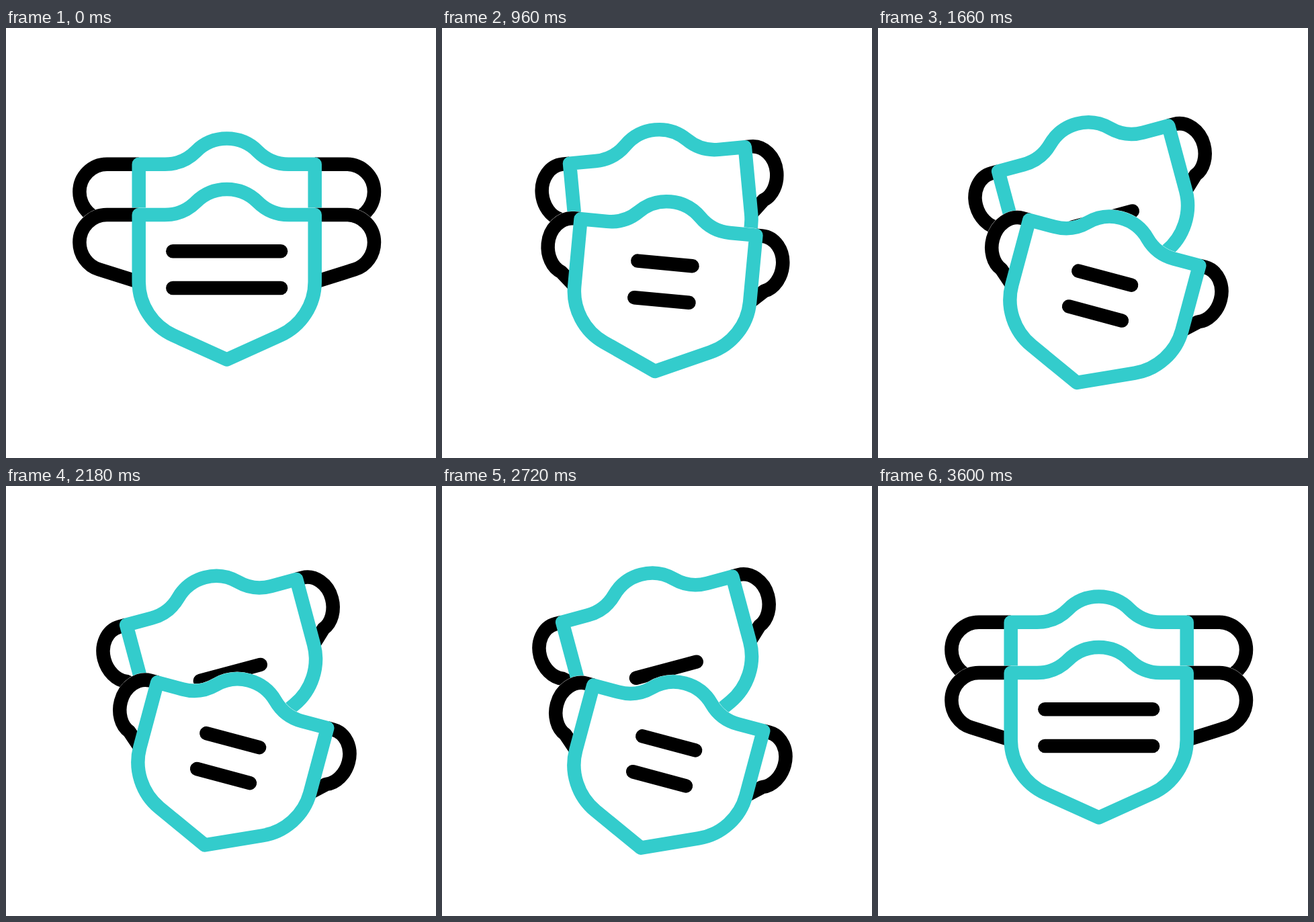
Recreate the animation shown at these times as an HTML page. Size 640 by 640 pixels, loop 3.62 s.

```html
<!DOCTYPE html>
<html lang="en">
<head>
<meta charset="utf-8">
<title>Two face masks</title>
<style>
  html, body { margin: 0; width: 100%; height: 100%; overflow: hidden; background: #fff; }
  svg { display: block; width: 100vw; height: 100vh; }
  .ink { fill: none; stroke: #000; stroke-width: 20.5; stroke-linejoin: round; }
  .loop { fill: #fff; }
  .bar { stroke-linecap: round; }
  .body { fill: #fff; stroke: #33cccc; stroke-width: 20.5; stroke-linejoin: round; }
  .halo { fill: #fff; stroke: #fff; stroke-width: 21; stroke-linejoin: round; }
</style>
</head>
<body>
<svg id="stage" viewBox="0 0 640 640"></svg>
<script>
const LOOP_MS = 3620, CENTER_X = 328.7, PIVOT_Y = 89;

// Keyframes as [ms, value], eased between neighbours
const SHRINK = [[200, 0], [800, 1], [3200, 1], [3600, 0]];
const TURN = [[800, 0], [1200, 1], [2800, 1], [3200, 0]];
const BOB = [[1200, 0], [1600, 1], [2000, 0], [2400, 1], [2800, 0]];
const BOB_SIZE = 12.9;

// Outline relative to the middle of the mask's top corners
const BODY = 'M-131 0H-92A65 65 0 0 0-46-19A65 65 0 0 1 46-19A65 65 0 0 0 92 0H131V100' +
  'C131 134 110.5 165.5 79.5 179.5L0 215.5L-79.5 179.5' +
  'C-110.5 165.5-131 134-131 100Z';

// Ear loops: mirror direction and how far each draws in
const SIDES = [{ dir: 1, pull: 38.5 }, { dir: -1, pull: 37 }];

const mix = (a, b, k) => a + (b - a) * k;
const ease = u => u * u * (3 - 2 * u);

function sample(keys, t) {
  if (t <= keys[0][0]) return keys[0][1];
  for (let i = 1; i < keys.length; i++) {
    const [t0, a] = keys[i - 1], [t1, b] = keys[i];
    if (t < t1) return mix(a, b, ease((t - t0) / (t1 - t0)));
  }
  return keys[keys.length - 1][1];
}

function loopPath(k, pull) {
  const start = 178.5 - pull * k;
  const edge = 219.3 - (pull + 6.2) * k;
  const end = 190.5 - (pull + 1) * k;
  const mid = 41, round = (edge - start) * 0.552, tail = (edge - end) * 0.6;
  return `M131 0H${start}C${start + round} 0 ${edge} ${mid - 22.6} ${edge} ${mid}` +
    `C${edge} ${mid + 18} ${end + tail} 76 ${end} 81.3L131 100`;
}

function add(parent, tag, attrs) {
  const el = document.createElementNS('http://www.w3.org/2000/svg', tag);
  for (const name in attrs) el.setAttribute(name, attrs[name]);
  return parent.appendChild(el);
}

function makeMask({ top, tilt, rise, halo, bars }) {
  const group = add(stage, 'g', {});
  const loops = [];
  const addLoops = cls => {
    for (const { dir, pull } of SIDES)
      loops.push({ pull, el: add(group, 'path', { class: cls, transform: `scale(${dir} 1)` }) });
  };
  if (halo) {
    addLoops('halo');
    add(group, 'path', { class: 'halo', d: BODY });
  }
  addLoops('ink loop');
  add(group, 'path', { class: 'body', d: BODY });
  const lines = bars.map(([y, half]) => ({ y, half, el: add(group, 'path', { class: 'ink bar' }) }));

  return t => {
    const k = sample(SHRINK, t), turn = sample(TURN, t);
    const y = top + Math.sign(rise) * (Math.abs(rise) * turn - BOB_SIZE * sample(BOB, t));
    group.setAttribute('transform',
      `translate(${CENTER_X} ${y}) rotate(${tilt * turn} 0 ${PIVOT_Y})`);
    for (const { pull, el } of loops) el.setAttribute('d', loopPath(k, pull));
    for (const { y, half, el } of lines) {
      const w = mix(80.4, half, k);
      el.setAttribute('d', `M${-w} ${y}H${w}`);
    }
  };
}

const stage = document.getElementById('stage');
const masks = [
  makeMask({ top: 202.7, tilt: -15, rise: -38.4, halo: false, bars: [[108.8, 46.5]] }),
  makeMask({ top: 278, tilt: 15, rise: 50.8, halo: true, bars: [[54.2, 40.8], [109, 40.8]] })
];

const began = performance.now();
function draw() {
  const t = (performance.now() - began) % LOOP_MS;
  for (const pose of masks) pose(t);
  requestAnimationFrame(draw);
}
draw();
</script>
</body>
</html>
```
